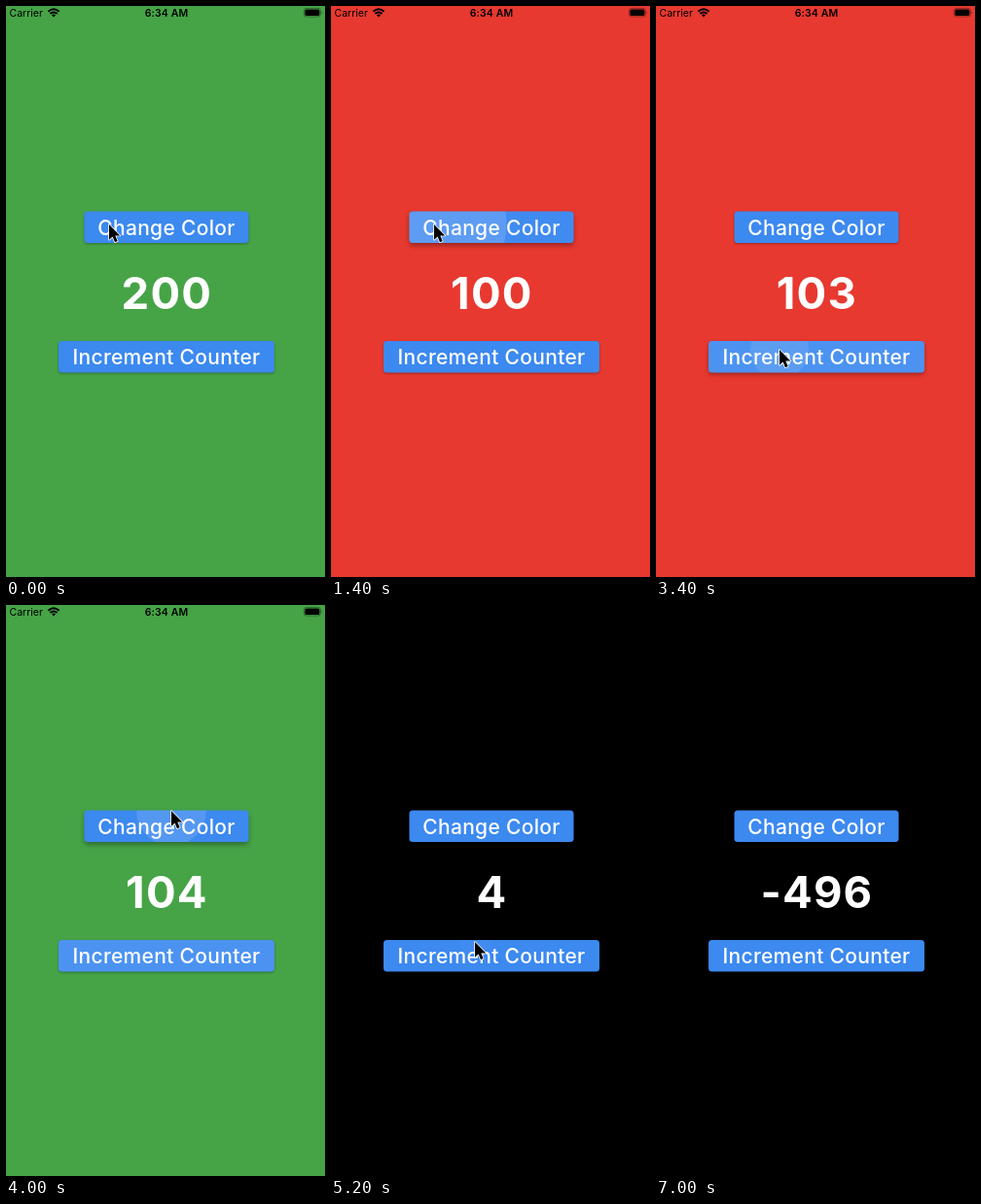
These frames come from a looping animation (328 by 588 pixels, 7.9 s). An HTML page:

```html
<!DOCTYPE html>
<html lang="en">
<head>
<meta charset="utf-8">
<title>Color and counter</title>
<style>
  html, body { margin: 0; width: 100%; height: 100%; overflow: hidden; }
  svg { display: block; width: 100vw; height: 100vh; font-family: Inter, Roboto, sans-serif; }
  .label { font-size: 21px; font-weight: 500; letter-spacing: .32px; fill: #fff; text-anchor: middle; }
  #count { font-size: 45.5px; font-weight: 700; letter-spacing: 1.2px; fill: #fff; text-anchor: middle; }
  .status { font-size: 10.5px; }
  .button { fill: #3c89f0; }
</style>
</head>
<body>
<svg viewBox="0 0 328 588">
  <defs>
    <clipPath id="clip0"><rect x="80.5" y="211.5" width="169" height="32.5" rx="3.5"/></clipPath>
    <clipPath id="clip1"><rect x="54" y="345" width="222" height="32.5" rx="3.5"/></clipPath>
  </defs>
  <rect id="stage" width="328" height="588"/>

  <g class="status">
    <text x="3.5" y="11">Carrier</text>
    <text x="165" y="11" font-weight="600" letter-spacing=".1" text-anchor="middle">6:34 AM</text>
    <g fill="none" stroke="#000" stroke-width="2">
      <path d="M43.4 5.7Q49 .7 54.6 5.7M45.4 8.1Q49 5 52.6 8.1"/>
      <path d="M47 9.3Q49 7.8 51 9.3L49 11.6Z" fill="#000" stroke="none"/>
    </g>
    <rect x="306.4" y="2.4" width="17" height="8.6" rx="2.4" fill="none" stroke="#000" stroke-opacity=".45" stroke-width=".8"/>
    <rect x="307.4" y="3.4" width="15" height="6.6" rx="1.5"/>
    <path d="M324.5 5.2Q326.3 6.7 324.5 8.2Z" fill-opacity=".5"/>
  </g>

  <rect class="button" x="80.5" y="211.5" width="169" height="32.5" rx="3.5"/>
  <rect class="button" x="54" y="345" width="222" height="32.5" rx="3.5"/>
  <g class="ripples" clip-path="url(#clip0)"></g>
  <g class="ripples" clip-path="url(#clip1)"></g>
  <text class="label" x="165" y="235.6">Change Color</text>
  <text class="label" x="165" y="369.1">Increment Counter</text>
  <text id="count" x="165.4" y="312"></text>
  <path id="cursor" d="M0 0V15.8L3.6 12.5 6 18.2 8.7 17 6.3 11.5H11.3Z"
        stroke="#fff" stroke-width="1.6" stroke-linejoin="round" paint-order="stroke"/>
</svg>
<script>
const LOOP = 7900, STEP = 100, RELEASE = 70, CURSOR_GONE = 6900;
const CHANGE = 0, INCREMENT = 1;

// Each color decides how far one increment goes; entering black also costs 100.
const themes = [
  { color: '#e73930', size: 1 },
  { color: '#46a447', size: 10 },
  { color: '#3c89f0', size: 100 },
  { color: '#000', size: -100 }
];
const presses = [
  [CHANGE, [630, 910, 1170]],
  [INCREMENT, [2650, 3000, 3300, 3600]],
  [CHANGE, [3880, 4180, 4480]],
  [INCREMENT, [5150, 5390, 5620, 5860, 6080]]
];
const cursorPath = [
  [0, 106, 225], [1650, 106, 225], [2300, 127, 354], [3720, 127, 354],
  [3880, 170, 212], [4720, 170, 212], [5080, 148, 347], [LOOP, 148, 347]
];

const byId = id => document.getElementById(id);
const clamp = v => Math.max(0, Math.min(1, v));
const buttons = document.querySelectorAll('.button');
const layers = document.querySelectorAll('.ripples');

function cursorAt(t) {
  const i = cursorPath.findIndex(key => key[0] > t);
  const [t0, x0, y0] = cursorPath[i - 1], [t1, x1, y1] = cursorPath[i];
  const p = (t - t0) / (t1 - t0), k = p * p * (3 - 2 * p);
  return [x0 + (x1 - x0) * k, y0 + (y1 - y0) * k];
}

const clicks = presses.flatMap(([button, times]) => times.map(time => {
  const ripple = document.createElementNS('http://www.w3.org/2000/svg', 'circle');
  const [x, y] = cursorAt(time);
  ripple.setAttribute('cx', x);
  ripple.setAttribute('cy', y);
  ripple.setAttribute('fill', '#fff');
  layers[button].append(ripple);
  return { button, time, ripple };
}));

function drawRipple(ripple, age) {
  const a = Math.max(0, age);
  const visible = age > 0 ? clamp((a / 130) ** 2) * clamp((520 - a) / 220) : 0;
  ripple.setAttribute('r', 5 + .21 * a + .0004 * a * a);
  ripple.setAttribute('opacity', .15 * visible);
}

function draw(t) {
  let theme = 1, count = 200;
  const lift = [0, 0];
  for (const { button, time, ripple } of clicks) {
    const age = t - time;
    drawRipple(ripple, age);
    lift[button] = Math.max(lift[button], clamp((age - 60) / 60) * clamp((400 - age) / 150));
    if (age < RELEASE) continue;
    if (button === INCREMENT) {
      count += themes[theme].size;
    } else {
      theme = (theme + 1) % themes.length;
      if (theme === 3) count -= 100;
    }
  }
  byId('stage').setAttribute('fill', themes[theme].color);
  byId('count').textContent = count;
  buttons.forEach((button, i) => {
    const e = lift[i];
    button.style.filter = `drop-shadow(0 ${1 + 2 * e}px ${1 + 1.5 * e}px rgba(0,0,0,.32))`;
  });
  byId('cursor').setAttribute('transform', `translate(${cursorAt(t)})`);
  byId('cursor').setAttribute('visibility', t < CURSOR_GONE ? 'visible' : 'hidden');
}

const start = performance.now();
function frame() {
  const t = (performance.now() - start) % LOOP;
  draw(Math.floor(t / STEP) * STEP);
  requestAnimationFrame(frame);
}
frame();
</script>
</body>
</html>
```
